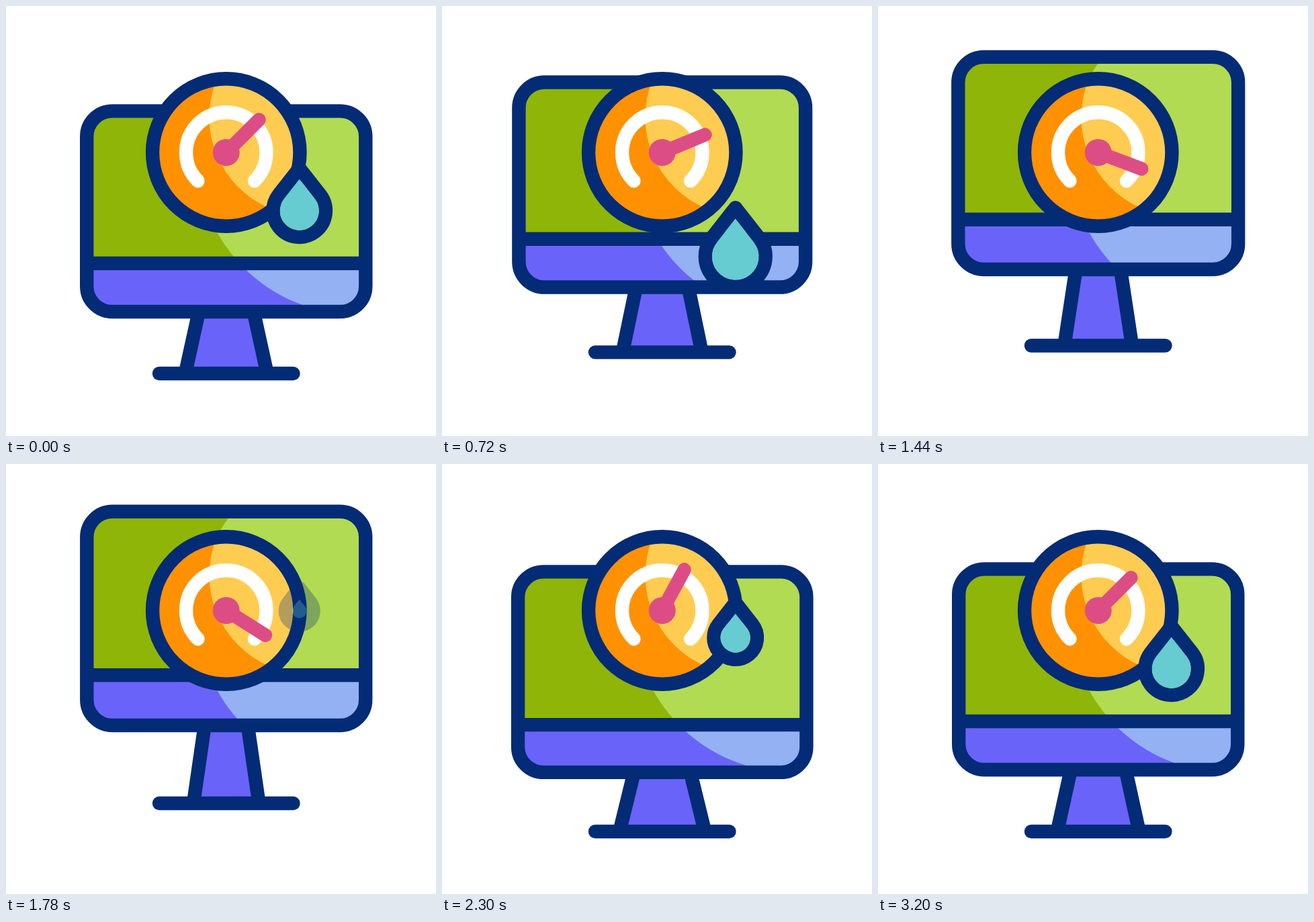
An HTML page with a canvas for the animation above (3.6 s loop, 640 by 640 pixels).

```html
<!DOCTYPE html>
<html lang="en">
<head>
<meta charset="utf-8">
<title>Monitor gauge</title>
<style>
  html, body { margin: 0; width: 100%; height: 100%; overflow: hidden; background: #fff; }
  canvas { display: block; width: 100vmin; height: 100vmin; }
</style>
</head>
<body>
<canvas id="stage" width="640" height="640"></canvas>
<script>
const ctx = document.getElementById('stage').getContext('2d');
const LOOP = 3600, CX = 327.75, CY = 218, LINE = 20.4;
const NAVY = '#042b75', PINK = '#dc4d85', TEAL = '#66ccd1', PURPLE = '#6a63f9';

// The monitor crouches, jumps and lands between three poses
const POSES = {
  width: [435.5, 461, 435],
  height: [319, 310, 339],
  bottom: [465.2, 481, 399],
  panel: [72, 68.5, 74.8],
  legTop: [43, 49.8, 33.3],
  legFoot: [61, 71, 48.5],
  needle: [45, 17.5, 125]
};
const CROUCHED = 530, JUMP = 540, PEAK = 1880, FALL = 1900, LANDED = 2400;

const mix = (a, b, p) => a + (b - a) * p;
const ramp = (t, from, to) => Math.min(1, Math.max(0, (t - from) / (to - from)));
const smooth = u => u * u * (3 - 2 * u);
const easeOut = u => 1 - (1 - u) ** 2;
const drift = u => u ** 1.3;

// Quick take-off that hangs in the air; a higher snap gets up sooner
function lift(t, snap, fall, landed = LANDED) {
  return t < FALL
    ? 1 - (1 - ramp(t, JUMP, PEAK) ** 0.4) ** snap
    : 1 - fall(ramp(t, FALL, landed));
}

function crouch(t, depth, release) {
  return t < FALL ? ramp(t, 0, CROUCHED) ** 2 : depth * (1 - release);
}

function pose(name, down, up) {
  const [rest, low, high] = POSES[name];
  return mix(mix(rest, low, down), high, up);
}

function disc(x, y, r, color) {
  ctx.beginPath();
  ctx.arc(x, y, r, 0, 2 * Math.PI);
  ctx.fillStyle = color;
  ctx.fill();
}

function line(color, cap, ...points) {
  ctx.beginPath();
  points.forEach(([x, y]) => ctx.lineTo(x, y));
  ctx.strokeStyle = color;
  ctx.lineCap = cap;
  ctx.stroke();
}

// Paints a region dark, with the part inside a circle light
function shade(region, dark, light, x, y, r) {
  ctx.save();
  ctx.clip(region);
  ctx.fillStyle = dark;
  ctx.fill(region);
  disc(x, y, r, light);
  ctx.restore();
}

function box(x, y, w, h) {
  const path = new Path2D();
  path.rect(x, y, w, h);
  return path;
}

function drawStand(bottom, base, top, foot) {
  // The legs start a little way up behind the screen
  const lean = (foot - top) * 0.1, y0 = bottom - (base - bottom) * 0.1;
  const leg = side => [[CX + side * (top - lean), y0], [CX + side * foot, base]];
  const left = leg(-1), right = leg(1);
  ctx.beginPath();
  [...left, right[1], right[0]].forEach(([x, y]) => ctx.lineTo(x, y));
  ctx.fillStyle = PURPLE;
  ctx.fill();
  line(NAVY, 'butt', ...left);
  line(NAVY, 'butt', ...right);
  line(NAVY, 'round', [228, base], [427.5, base]);
}

function drawScreen(width, height, bottom, panel) {
  const w = width - LINE, h = height - LINE, x = CX - w / 2, y = bottom - LINE / 2 - h;
  const split = y + h - panel;
  const frame = new Path2D();
  frame.roundRect(x, y, w, h, 38);
  ctx.save();
  ctx.clip(frame);
  shade(box(x, y, w, split - y), '#8fb509', '#b1db52', 522, 221.7, 237.5);
  shade(box(x, split, w, panel), PURPLE, '#94b1f3', 522, 221.7, 237.5);
  ctx.restore();
  line(NAVY, 'butt', [x, split], [x + w, split]);
  ctx.stroke(frame);
}

function drawGauge(angle) {
  const dial = new Path2D();
  dial.arc(CX, CY, 109.7, 0, 2 * Math.PI);
  shade(dial, '#ff9102', '#ffcc52', 449.8, 165.4, 147.3);
  ctx.strokeStyle = NAVY;
  ctx.stroke(dial);

  ctx.beginPath();
  ctx.arc(CX, CY, 59.7, 0.75 * Math.PI, 0.25 * Math.PI);
  ctx.strokeStyle = '#fff';
  ctx.lineCap = 'round';
  ctx.stroke();

  const a = angle * Math.PI / 180;
  line(PINK, 'round', [CX, CY], [CX + 69 * Math.sin(a), CY - 69 * Math.cos(a)]);
  disc(CX, CY, 20, PINK);
}

// A circle with two tangents that meet in a tip above it
function tear(y, r) {
  const x = 436.7, reach = 1.62, a = Math.asin(1 / reach);
  const path = new Path2D();
  path.moveTo(x, y - r * reach);
  path.arc(x, y, r, -a, Math.PI + a);
  path.closePath();
  return path;
}

function drawDrop(y, r, opacity) {
  ctx.globalAlpha = opacity;
  ctx.strokeStyle = NAVY;
  ctx.stroke(tear(y, r));
  // The filling stops at the outline, so the two never blend
  if (r > LINE / 2) {
    ctx.fillStyle = TEAL;
    ctx.fill(tear(y, r - LINE / 2));
  }
  ctx.globalAlpha = 1;
}

// Falls while swelling, then shrinks away
function dropLeaving(t) {
  const fall = smooth(ramp(t, 0, 1340) ** 1.4), fade = 1 - ramp(t, 860, 1340);
  drawDrop(304.7 + 179 * fall, mix(5, 39.2 + 15 * fall, fade), fade);
}

// Grows out of the dial and slides to its resting place
function dropArriving(t) {
  const y = mix(216, 304.7, smooth(ramp(t, 1640, 3000)));
  const r = mix(20, 39.2, smooth(ramp(t, 1640, 2750)));
  drawDrop(y, r, ramp(t, 1640, 2110));
}

function draw(t) {
  const down = crouch(t, 0.75, smooth(ramp(t, LANDED, 2700)));
  const shape = name => pose(name, down, lift(t, 1.28, drift));
  const bottom = pose('bottom', down, lift(t, 1.7, smooth));
  const base = 547 - 42 * lift(t, 2.35, drift, 2200);
  const needle = pose('needle', crouch(t, 1, easeOut(ramp(t, LANDED, 2900))), lift(t, 1.05, smooth));

  ctx.fillStyle = '#fff';
  ctx.fillRect(0, 0, 640, 640);
  ctx.lineWidth = LINE;
  ctx.lineJoin = 'round';
  drawStand(bottom, base, shape('legTop'), shape('legFoot'));
  drawScreen(shape('width'), shape('height'), bottom, shape('panel'));
  drawGauge(needle);
  if (t < 1340) dropLeaving(t);
  else if (t > 1640) dropArriving(t);
}

const start = performance.now();
function tick() {
  draw((performance.now() - start) % LOOP);
  requestAnimationFrame(tick);
}
tick();
</script>
</body>
</html>
```
